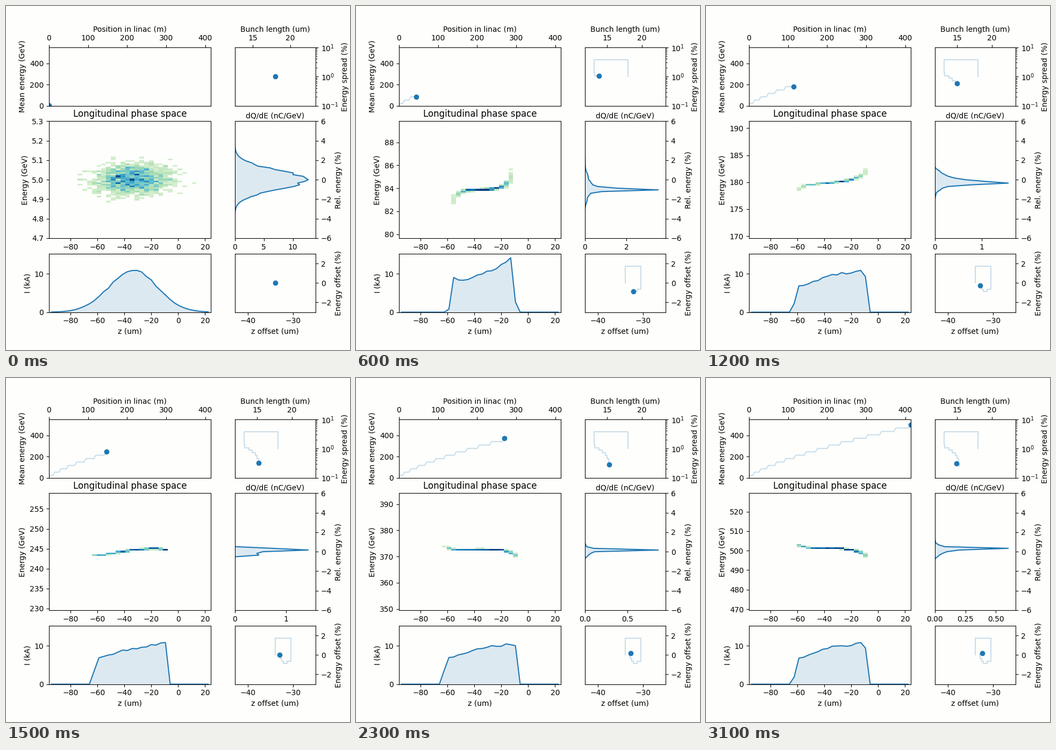
These frames come from a looping animation (640 by 640 pixels, 3200 ms). A matplotlib script:

```python
import math

import matplotlib.pyplot as plt
import numpy as np
from matplotlib.animation import FuncAnimation

FRAMES = 32
STAGES = 16
GAIN = 31.9
COLS, ROWS = 34, 69
Z_MIN, Z_MAX = -96.1, 24.1
TOTAL = 139  # bunch charge: sum of the slice currents in kA
BLUE = "#1f77b4"
PAPER = "#fefefc"

col = np.arange(COLS)
z_mid = Z_MIN + (col + 0.5) * (Z_MAX - Z_MIN) / COLS
rel_edges = np.linspace(-6, 6, ROWS + 1)
rel_mid = (rel_edges[1:] + rel_edges[:-1]) / 2
erf = np.vectorize(math.erf)

# Odd steps add a stage (energy), even steps add an interstage (position in z).
steps = np.arange(FRAMES)
stage = (steps + 1) // 2
drift = steps // 2

energy = 5 + GAIN * np.maximum(np.arange(STAGES + 1) - 0.5, 0)
spread = np.interp(stage, [0, 1, 2, 3, 5, 8, 10, 12, 16],
                   [1, 3.74, 1.33, 1.05, 0.71, 0.316, 0.25, 0.283, 0.302])
offset = np.interp(stage, [0, 1, 2, 3, 5, 8, 12, 16],
                   [0, 1.73, -0.66, -0.87, -0.385, 0.04, 0.165, 0.165])
length = np.interp(drift, [0, 1, 2, 3, 5, 7, 11, 15],
                   [18, 13.13, 13.22, 13.85, 14.77, 15.24, 15.33, 14.93])
z_mean = np.interp(drift, [0, 1, 2, 3, 5, 7, 11, 15],
                   [-33.95, -30.41, -31.3, -32.1, -32.83, -32.94, -32.7, -32.35])

# Interstages grow with the square root of the energy.
travel = np.where(steps % 2, 5.05, 1.51 * np.sqrt(energy[stage]))
travel[:2] = 0, 2.5
position = np.cumsum(travel)


def profile(n):
    """Slice currents: a Gaussian that turns into a sloped box with end spikes."""
    if n == 0:
        shape = np.exp(-((col - 17.1) / 5.09) ** 2 / 2)
    else:
        keys = [1, 3, 5, 7, 11, 15]
        left = np.interp(n, keys, [12, 10.9, 9.87, 9.45, 9.4, 9.72])
        right = np.interp(n, keys, [24, 24.2, 24.75, 25, 25, 24.85])
        u = np.clip((col + 0.5 - left) / (right - left), 0, 1)
        spikes = 8 * np.exp(-np.abs(col - left) / 1.2)
        spikes += 12 * np.exp(-np.abs(right - 1 - col) / 1.6)
        shape = 6 + 4.2 * np.sin(u * np.pi / 2) + spikes * math.exp((1 - n) / 1.5)
        shape *= np.clip(col + 1 - left, 0, 1) * np.clip(right - col, 0, 1)
    shape *= np.random.default_rng(n).normal(1, 0.025, COLS)
    return TOTAL * shape / shape.sum()


def chirp(m, n):
    """Mean energy deviation of each slice in percent."""
    if m == 0:
        return np.zeros(COLS)
    if m == 1:
        return 1.75 - (1.15 * (col - 18) if n else 0.72 * (col - 17))
    keys = [2, 3, 5, 8, 12, 16]
    level = np.interp(m, keys, [-0.72, -1.03, -0.52, 0.14, 0.25, 0.34])
    slope = np.interp(m, keys, [0, 0.15, 0.35, 0.38, 0, -0.15])
    bow = np.interp(m, keys, [0, 0.2, 0.4, -0.22, -0.26, -0.2])
    curl = np.interp(m, keys, [2.5, 2.2, 0.8, -0.1, -0.35, -0.36])
    x = (col - 17) / 7
    return level + slope * x + bow * x**2 + curl * x**5


def beam(k):
    """Current, phase-space density and energy spectrum at step k."""
    m, n = stage[k], drift[k]
    rng = np.random.default_rng(40 + k)
    current = profile(n)
    mean = chirp(m, n)
    sigma = np.hypot(5 / energy[m], 0.45 * np.gradient(mean))
    u = (rel_edges[:, None] - mean) / (sigma * math.sqrt(2))
    density = np.diff(erf(u), axis=0) / 2 * current
    counts = rng.poisson(density * 3000 / TOTAL)

    spectrum = density.sum(axis=1)
    if m == 0:
        spectrum *= rng.normal(1, 0.05, ROWS)
    # Charge in the fullest energy bin, in nC.
    peak = np.interp(m, [0, 1, 2, 3, 5, 8, 12, 16],
                     [0.11, 0.03, 0.607, 0.521, 0.434, 0.609, 0.555, 0.522])
    spectrum *= peak * ROWS / (0.12 * energy[m]) / spectrum.max()
    return current, counts / counts.max(), spectrum


fig, axes = plt.subplots(
    3, 2, figsize=(6.4, 6.4), dpi=100, facecolor=PAPER,
    gridspec_kw=dict(width_ratios=[2, 1], height_ratios=[1, 2, 1]))
(ax_gain, ax_spread), (ax_phase, ax_spec), (ax_cur, ax_off) = axes
for ax in axes.flat:
    ax.set_facecolor(PAPER)
for ax in (ax_gain, ax_spread):
    ax.xaxis.tick_top()
    ax.xaxis.set_label_position("top")
for ax in (ax_spread, ax_spec, ax_off):
    ax.yaxis.tick_right()
    ax.yaxis.set_label_position("right")

ax_gain.set(xlim=(0, position[-1]), ylim=(0, 551),
            xlabel="Position in linac (m)", ylabel="Mean energy (GeV)")
ax_spread.set_yscale("log")
ax_spread.set(ylim=(0.1, 10), xlabel="Bunch length (um)",
              ylabel="Energy spread (%)")
ax_phase.set(xlim=(Z_MIN, Z_MAX), ylabel="Energy (GeV)")
ax_phase.set_title("Longitudinal phase space")
ax_spec.set(ylim=(-6, 6), xlabel="dQ/dE (nC/GeV)", ylabel="Rel. energy (%)")
ax_spec.xaxis.set_label_position("top")
ax_cur.set(xlim=(Z_MIN, Z_MAX), ylim=(0, 15.25), xlabel="z (um)", ylabel="I (kA)")
ax_off.set(xlim=(-42.95, -24.95), ylim=(-3, 3), xlabel="z offset (um)",
           ylabel="Energy offset (%)")

paths = [
    (ax_gain, position, energy[stage] * (1 + offset / 100)),
    (ax_spread, length, spread),
    (ax_off, z_mean, offset),
]
trails = [ax.plot([], [], color=BLUE, alpha=0.23)[0] for ax, _, _ in paths]
dots = [ax.plot([], [], "o", color=BLUE)[0] for ax, _, _ in paths]

image = ax_phase.imshow(np.zeros((ROWS, COLS)), cmap="GnBu", vmin=0, vmax=1,
                        origin="lower", aspect="auto", interpolation="nearest",
                        extent=(Z_MIN, Z_MAX, 4.7, 5.3))


def area(ax):
    line, = ax.plot([], [], color=BLUE)
    fill, = ax.fill([0, 0, 0], [0, 0, 0], color=BLUE, alpha=0.15, lw=0)
    return line, fill


def set_area(parts, x, y, start, end):
    line, fill = parts
    line.set_data(x, y)
    fill.set_xy(np.vstack([start, np.column_stack([x, y]), end]))


spec_area, cur_area = area(ax_spec), area(ax_cur)


def update(k):
    current, density, spectrum = beam(k)
    for trail, dot, (_, x, y) in zip(trails, dots, paths):
        trail.set_data(x[:k + 1], y[:k + 1])
        dot.set_data(x[k:k + 1], y[k:k + 1])
    shortest = length[:k + 1].min()
    ax_spread.set_xlim(min(0.7 * length[0], 0.9 * shortest), 1.3 * length[0])

    low, high = energy[stage[k]] * np.array([0.94, 1.06])
    image.set_data(np.ma.masked_where(density < 0.1, 0.08 + 0.92 * density))
    image.set_extent((Z_MIN, Z_MAX, low, high))
    ax_phase.set_ylim(low, high)

    set_area(spec_area, spectrum, rel_mid, (0, rel_mid[0]), (0, rel_mid[-1]))
    ax_spec.set_xlim(0, 1.1 * spectrum.max())
    set_area(cur_area, z_mid, current, (z_mid[0], 0), (z_mid[-1], 0))
    return [image, *spec_area, *cur_area, *trails, *dots]


anim = FuncAnimation(fig, update, frames=FRAMES, init_func=lambda: update(0),
                     interval=100, repeat=True, repeat_delay=0, blit=False)
plt.show()
```
